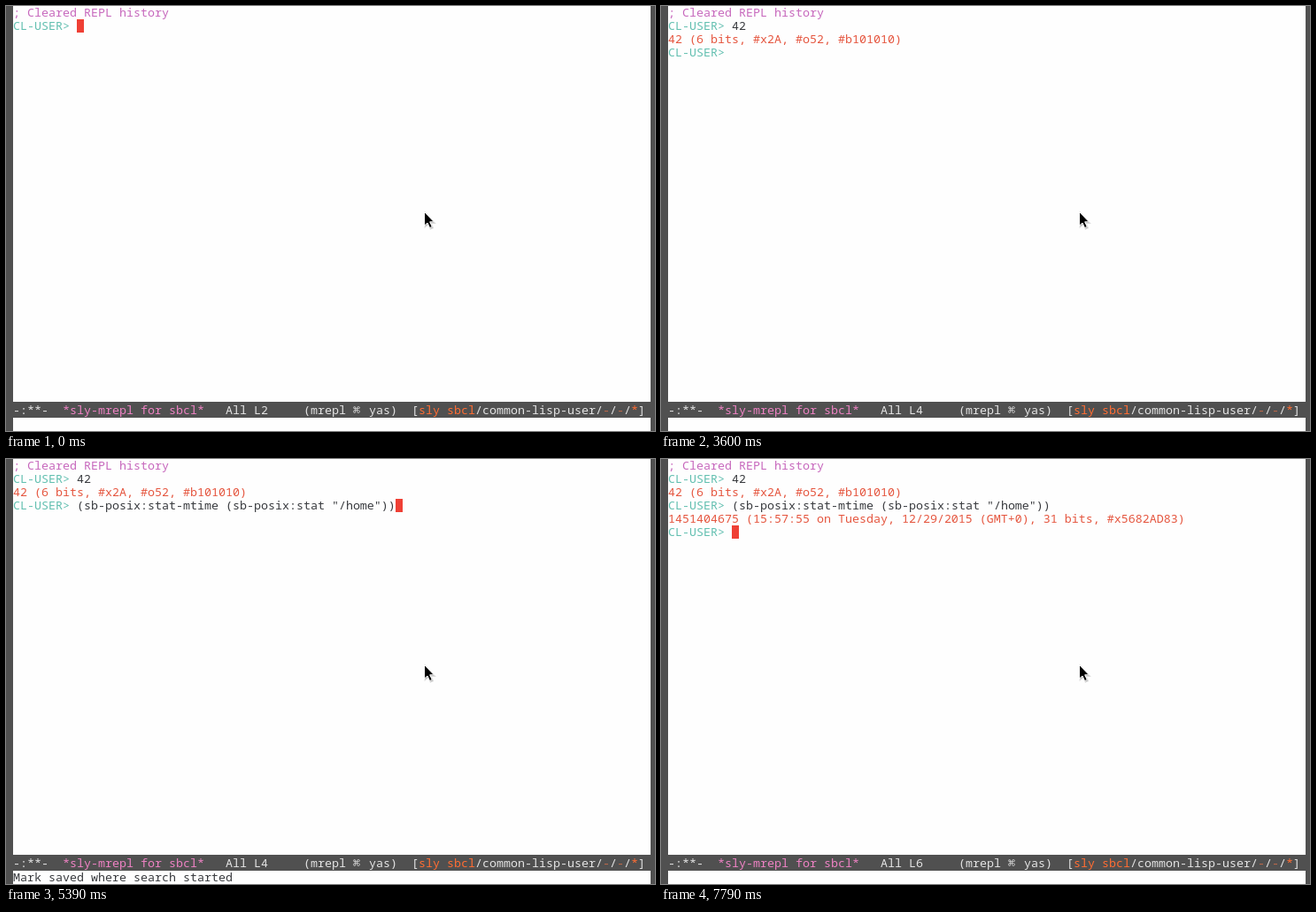
An HTML page for the animation above (8 s loop, 733x480 px).

```html
<!DOCTYPE html>
<html lang="en">
<head>
<meta charset="utf-8">
<title>REPL session</title>
<style>
  html, body { margin: 0; width: 100%; height: 100%; overflow: hidden; background: #fefefe; }
  svg { display: block; width: 733px; height: 480px; }
  text { font: 13.333px "Noto Sans Mono", "DejaVu Sans Mono", monospace; white-space: pre; }
</style>
</head>
<body>
<svg viewBox="0 0 733 480">
  <path fill="#505050" d="M0 0H8V480H0zM728 0h5V480h-5zM0 447H733v18H0z"/>
  <g id="screen"></g>
  <path d="M473 233V248L476.3 245 479 250.5 481.3 249.4 478.8 244H483z"
        transform="translate(.6 1)" fill="#0003" stroke="#0002" stroke-width="2"/>
  <path d="M472.5 232.5V248L476 245 478.6 250.6 481.3 249.4 478.7 243.8H483.3z" fill="#000" stroke="#fff"/>
</svg>
<script>
const LOOP = 8000, CELL = 8, ROW = 15;
const INK = '#383a3e', TEAL = '#62bfb0', PURPLE = '#c768bd', RESULT = '#e5563f',
      BLUE = '#52acd3', RED = '#ef4035', MATCH = '#f3b12c', PAREN = '#6dabce',
      LIGHT = '#e4e4e4', PINK = '#ee82c4', ORANGE = '#ff6d33', DIM = '#c0694a';
const FORM = '(sb-posix:stat-mtime (sb-posix:stat "/home"))';
const screen = document.getElementById('screen');

const esc = s => s.replace(/&/g, '&amp;').replace(/</g, '&lt;');
const text = (x, base, fill, s) => `<text x="${x}" y="${base}" fill="${fill}">${esc(s)}</text>`;
const line = (col, row, fill, s) => text(8 + col * CELL, row * ROW + 12, fill, s);
const block = (col, row, fill, n = 1) =>
  `<rect x="${8 + col * CELL}" y="${row * ROW}" width="${n * CELL}" height="${ROW}" fill="${fill}"/>`;
const prompt = row => line(0, row, TEAL, 'CL-USER>');

// Text with some cells shown in another colour: marks = [[from, count, background, ink], ...]
function marked(col, row, s, marks) {
  let plain = s, out = '';
  for (const [from, n, back, ink] of marks) {
    plain = plain.slice(0, from) + ' '.repeat(n) + plain.slice(from + n);
    out += block(col + from, row, back, n) + line(col + from, row, ink, s.substr(from, n));
  }
  return out + line(col, row, INK, plain);
}

// The cursor starts visible at times[0] and flips at each later time
const blink = (t, times) => times.filter(x => t >= x).length % 2 === 1;

function modeLine(lineNo, searching) {
  let x = 8, out = '';
  const add = (fill, s) => { out += text(x, 461, fill, s); x += s.length * CELL; };
  add(LIGHT, '-:**-  ');
  add(PINK, '*sly-mrepl for sbcl*');
  add(LIGHT, `   All L${lineNo}     (mrepl `);
  add(LIGHT, '⌘');
  x += 2;
  add(LIGHT, ` yas${searching ? ' Isearch' : ''})  [`);
  add(ORANGE, 'sly sbcl');
  add(LIGHT, '/common-lisp-user/');
  add(DIM, '-');
  add(LIGHT, '/');
  add(DIM, '-');
  add(LIGHT, '/');
  add(ORANGE, '*');
  add(LIGHT, ']');
  return out;
}

function search(t) {
  const col = 27;
  let out = line(0, 3, BLUE, 'History I-search backward:');
  if (t < 4500) return out + block(col, 3, RED);
  const start = t < 4800 ? 40 : 15;
  const length = t < 4800 ? 1 : t < 4950 ? 2 : t < 5090 ? 4 : 5;
  const marks = [[start, 1, RED, MATCH]];
  if (length > 1) marks.push([start + 1, length - 1, MATCH, '#fefefe']);
  return out + marked(col, 3, FORM, marks) + text(8, 477, INK, 'History item: 2');
}

function entered(t) {
  const last = FORM.length - 1, ink = '#587f97';
  const lit = t >= 5540 && t < 5990;
  let out = prompt(3) + marked(9, 3, FORM, lit ? [[0, 1, PAREN, ink], [last, 1, PAREN, ink]] : []);
  if (t < 5840)
    return out + block(9 + FORM.length, 3, RED) + text(8, 477, INK, 'Mark saved where search started');
  out += line(0, 4, RESULT, '1451404675 (15:57:55 on Tuesday, 12/29/2015 (GMT+0), 31 bits, #x5682AD83)') + prompt(5);
  return out + (blink(t, [5840, 6290, 6890, 7340, 7790]) ? block(9, 5, RED) : '');
}

function frame(t) {
  let out = line(0, 0, PURPLE, '; Cleared REPL history') + prompt(1);
  if (t >= 900) out += line(9, 1, INK, '42');
  if (t < 2100) {
    if (blink(t, [0, 150, 750, 1350, 1950])) out += block(t < 900 ? 9 : 11, 1, RED);
  } else {
    out += line(0, 2, RESULT, '42 (6 bits, #x2A, #o52, #b101010)');
    if (t < 4050) out += prompt(3) + (blink(t, [2100, 2700, 3150, 3600]) ? block(9, 3, RED) : '');
    else out += t < 5390 ? search(t) : entered(t);
  }
  return out + modeLine(t < 2100 ? 2 : t < 5840 ? 4 : 6, t >= 4050 && t < 5390);
}

let shown = '';
const begin = performance.now();
function tick() {
  const next = frame((performance.now() - begin) % LOOP);
  if (next !== shown) screen.innerHTML = shown = next;
  requestAnimationFrame(tick);
}
tick();
</script>
</body>
</html>
```
